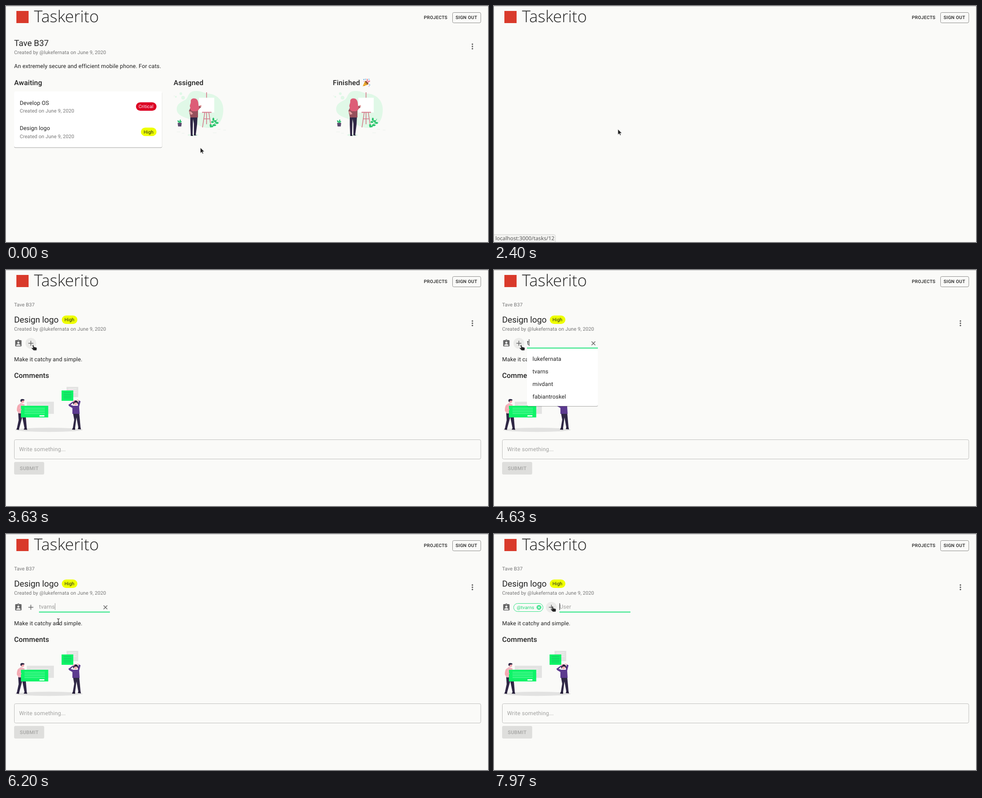
Animation of 1067 by 525 pixels, one loop 8000 ms. Source, as an HTML page:

```html
<!DOCTYPE html>
<html lang="en">
<head>
<meta charset="utf-8">
<title>Taskerito</title>
<style>
html, body { margin: 0; width: 100%; height: 100%; overflow: hidden; background: #fafaf8; }
svg { display: block; }
text { font: 12.5px Roboto, sans-serif; letter-spacing: .117px; fill: #222; white-space: pre; text-rendering: geometricPrecision; }
.small { font-size: 10.94px; fill: #757575; }
.title { font-size: 18.75px; letter-spacing: 0; }
.head { font-size: 15.62px; font-weight: 500; }
.button { font-size: 10.94px; font-weight: 500; letter-spacing: .31px; }
.nav { font-size: 10.16px; font-weight: 500; letter-spacing: .29px; }
.tag { font-size: 10.3px; }
.hint { fill: #a2a2a0; }
.brand { font: 300 36px "Open Sans", sans-serif; letter-spacing: 0; }
.url { font: 11.8px "Noto Sans", sans-serif; letter-spacing: 0; fill: #555; }
.paper { fill: #fff; filter: drop-shadow(0 1px .6px rgba(0,0,0,.36)); }
.icon { fill: none; stroke: #666; stroke-width: 1.5; }
</style>
</head>
<body>
<svg id="stage" width="1067" height="525" viewBox="0 0 1067 525">
<defs>
  <clipPath id="rowClip"><rect x="18" y="252" width="327.5" height="56"/></clipPath>

  <g id="high">
    <rect width="34.5" height="18.75" rx="9.4" fill="#eeff00"/>
    <text class="tag" x="6.1" y="13">High</text>
  </g>

  <g id="dots" fill="#666"><circle cy="-5" r="1.7"/><circle r="1.7"/><circle cy="5" r="1.7"/></g>

  <g id="painter">
    <path d="M378 228C379 216 390 213 398 208C405 202 402 189 421 189C434 189 438 194 449 195C468 197 481 211 481 230C481 254 470 271 449 271C427 272 419 257 402 250C386 245 377 239 378 228Z" fill="#e0f8e7"/>
    <g fill="#e0f8e7"><circle cx="387" cy="195" r="3"/><circle cx="376" cy="202" r="2"/><circle cx="392" cy="204" r="4"/></g>
    <g fill="none" stroke="#e9f0eb"><path d="M371 200h3M378 280h8M389 283h6M468 274h7M481 276h6M458 282h8"/></g>
    <ellipse cx="414" cy="287" rx="12" ry="2.5" fill="#dff5e6"/>
    <g fill="none" stroke="#d5798a" stroke-width="1.6"><path d="M444 192V263M440 237L435 270M449 237L454 270M437 251H451"/></g>
    <rect x="427" y="204" width="34" height="33" fill="#fff"/>
    <path d="M434 236.5H455" stroke="#d5798a" stroke-width="2"/>
    <path d="M408 245H424L423 264L420 287H416L416 262L414 251L413 288H409L408 264Z" fill="#2f2745"/>
    <path d="M409 288l5-1v2h-5zM416 287h5l1 1h-6z" fill="#231d35"/>
    <path d="M411 221L405 233L407 242L408 248H425L425 231L432 225L430 221L422 226Z" fill="#96505c"/>
    <path d="M405 234l4 8 5-2-4-5zM429 222l3-2 1 3-2 2z" fill="#e6a0a0"/>
    <path d="M409 211C410 204 421 204 424 210C427 216 425 221 428 226C428 232 422 235 417 234C411 235 407 231 408 226C405 220 410 218 409 211Z" fill="#dd5d77"/>
    <path d="M380 260h9l-1 8h-7z" fill="#5b4a6d"/>
    <path d="M384 260q-5-1-4-6 4 1 4 6q-1-5 2-8 3 4-2 8q1-4 5-4 0 4-5 4" fill="#2fbf72"/>
    <path d="M452 270Q461 266 468 251" fill="none" stroke="#28c46b"/>
    <g fill="#28c46b">
      <ellipse cx="459" cy="252" rx="2" ry="3.5"/><ellipse cx="463" cy="256" rx="3" ry="2"/>
      <ellipse cx="467" cy="260" rx="3.5" ry="2"/><ellipse cx="457" cy="258" rx="3" ry="2"/>
      <ellipse cx="461" cy="265" rx="4" ry="2"/><ellipse cx="453" cy="265" rx="2.5" ry="2"/>
      <ellipse cx="455" cy="268" rx="4" ry="1.8"/>
    </g>
  </g>

  <g id="arrow"><path d="M-.8 0V12.4L2.2 9.8L4.2 14L6.1 13.1L4.2 9H8.2Z" fill="#222" stroke="#fff" stroke-width=".7"/></g>
  <g id="hand"><path d="M.5 2C.3 0 2.6 0 3 1.6L4 5L8.3 6C10 6.4 10.6 7.5 10.3 9L9.7 13H3.4L-1.3 8.6C-2 7.2 -.4 6.6 .8 7.2L1.8 7.6Z" fill="#222" stroke="#fff" stroke-width=".6"/></g>
  <g id="beam"><path d="M-3-6.5Q0-6.5 0-5Q0-6.5 3-6.5M0-5V5M-3 6.5Q0 6.5 0 5Q0 6.5 3 6.5M-1.5 1H1.5" fill="none" stroke="#333" stroke-width="1.2"/></g>
</defs>

<rect width="1067" height="525" fill="#fafaf8"/>
<rect width="1067" height="1" fill="#c6c6c5"/>
<rect x="23" y="11" width="27" height="27" fill="#d93a2b"/>
<text class="brand" x="62" y="36">Taskerito</text>
<text class="nav" x="925" y="29.3">PROJECTS</text>
<rect x="988.5" y="14.5" width="62.5" height="23" rx="3" fill="none" stroke="#8c8c8b"/>
<text class="nav" x="995.3" y="29.3">SIGN OUT</text>

<g id="board">
  <text class="title" x="18" y="89">Tave B37</text>
  <text class="small" x="18" y="107">Created by @lukefernata on June 9, 2020</text>
  <use href="#dots" x="1032.5" y="90"/>
  <text x="18" y="138">An extremely secure and efficient mobile phone. For cats.</text>
  <text class="head" x="18" y="176">Awaiting</text>
  <text class="head" x="371" y="176">Assigned</text>
  <text class="head" x="723.5" y="176">Finished</text>
  <g id="popper">
    <path d="M789.5 179L795 166.5Q801 169 802 174.5Z" fill="#f4b92f"/>
    <path d="M791 175.5l4 1.8M793 171l6 4.8" stroke="#d9822b" stroke-width="1.4"/>
    <ellipse cx="798.5" cy="170.5" rx="2" ry="5" transform="rotate(-42 798.5 170.5)" fill="#8d5a34"/>
    <path d="M798 169q3-3 1-7M801 171q1-4 5-4" fill="none" stroke="#e0475b" stroke-width="1.5"/>
    <path d="M791 163l2 1M795 162l1 2M803 162l1 2M804 175l2 1" stroke="#4598d8" stroke-width="1.6"/>
    <path d="M792 167l1 1M802 166l1 1M803 179l1-1" stroke="#d367b5" stroke-width="1.6"/>
  </g>
  <rect class="paper" x="18" y="190" width="327.5" height="124.5" rx="3"/>
  <g clip-path="url(#rowClip)">
    <rect id="rowHover" x="18" y="252" width="328" height="56" fill="#f2f2f1"/>
    <circle id="rowRipple" cx="275" cy="274" opacity=".1"/>
  </g>
  <text x="30.5" y="220">Develop OS</text>
  <text class="small" x="30.5" y="237">Created on June 9, 2020</text>
  <rect x="287.7" y="214.2" width="45.5" height="18.75" rx="9.4" fill="#dc0023"/>
  <text class="tag" x="293.4" y="227.2" style="fill:#fff">Critical</text>
  <text x="30.5" y="276.3">Design logo</text>
  <text class="small" x="30.5" y="293.5">Created on June 9, 2020</text>
  <use href="#high" x="298.7" y="270.5"/>
  <use href="#painter"/>
  <use href="#painter" x="353"/>
</g>

<g id="task">
  <text class="small" x="18" y="81.3">Tave B37</text>
  <text class="title" x="18" y="117">Design logo</text>
  <use href="#high" x="123.5" y="101.3"/>
  <text class="small" x="18" y="135">Created by @lukefernata on June 9, 2020</text>
  <use href="#dots" x="1032.5" y="118.5"/>
  <path transform="translate(18 153.7) scale(.781)" fill="#666" d="M19 3h-4.18C14.4 1.84 13.3 1 12 1c-1.3 0-2.4.84-2.82 2H5c-1.1 0-2 .9-2 2v14c0 1.1.9 2 2 2h14c1.1 0 2-.9 2-2V5c0-1.1-.9-2-2-2zm-7 0c.55 0 1 .45 1 1s-.45 1-1 1-1-.45-1-1 .45-1 1-1zm0 4c1.66 0 3 1.34 3 3s-1.34 3-3 3-3-1.34-3-3 1.34-3 3-3zm6 12H6v-1.4c0-2 4-3.1 6-3.1s6 1.1 6 3.1V19z"/>
  <text x="18" y="202.5">Make it catchy and simple.</text>
  <text class="head" x="18" y="240">Comments</text>

  <g id="talk">
    <ellipse cx="95" cy="355.5" rx="75" ry="4.7" fill="#e2e2e1"/>
    <rect x="46" y="293" width="60" height="27" fill="#e3e3e2"/>
    <path d="M54 300H98M54 304H98M54 308H98" stroke="#f1f1f0"/>
    <rect x="134" y="260" width="26" height="23" fill="#e3e3e2"/>
    <path d="M138 264.5H156M138 268.5H156M138 272.5H156" stroke="#f5f5f4"/>
    <path d="M27 317H43L46 352H41L36 327L29 353H24L28 334Z" fill="#2f2745"/>
    <path d="M23 355l1-3h5v3.5zM39 355l2-3h5l1 3.5z" fill="#251d38"/>
    <path d="M33 296L27 300L24 313L28 319H41V299Z" fill="#f2b3bf"/>
    <circle cx="36.5" cy="292" r="3.8" fill="#f4a9b0"/>
    <path d="M32 292Q31 287 36 287Q41 287 41 290L35 291L34 294Z" fill="#2f2745"/>
    <rect x="33" y="302" width="60.5" height="26" fill="#0ef468"/>
    <path d="M41 307.5H86M41 311.5H86M41 315.5H86M41 319.5H86" stroke="#7dfaae"/>
    <rect x="74" y="323" width="11" height="3" fill="#e9fff1"/>
    <path d="M26 301Q22 312 26 315L34 312V309L28 309L31 302Z" fill="#f4a9b0"/>
    <path d="M148 317H162L165 350H160L156 328L153 351H148L151 333Z" fill="#2f2745"/>
    <path d="M146 355l2-4h5v4.5zM159 354l1-4h5l1 4.5z" fill="#251d38"/>
    <path d="M149 302L143 300L150 294L149 292L138 300L140 303L147 307L147 320H163L162 304L165 292L161 290L159 302Z" fill="#5c3a8f"/>
    <circle cx="154" cy="297" r="3.5" fill="#f4a9b0"/>
    <path d="M149 300Q147 290 154 290Q161 290 160 300L157 295H152Z" fill="#30203f"/>
    <rect x="123" y="268" width="26" height="23" fill="#0ef468"/>
    <path d="M127 272.5H145M127 276.5H145M127 280.5H145M127 284.5H145" stroke="#15bd5a"/>
    <path d="M148 293l3-4 2 1-3 4zM161 291l-5-2 1-1 6 2z" fill="#f4a9b0"/>
  </g>

  <rect x="18.5" y="377.5" width="1032.5" height="43" rx="3" fill="none" stroke="#bebebc"/>
  <text class="hint" x="29" y="403.3">Write something...</text>
  <rect x="18" y="427" width="66.5" height="28" rx="3" fill="#dededc"/>
  <text class="button" x="30.5" y="445" style="fill:#a5a5a3">SUBMIT</text>

  <g id="chip">
    <rect x="43.5" y="154.5" width="65" height="18" rx="9" fill="none" stroke="#2fe283"/>
    <text class="tag" x="50.5" y="167" style="fill:#1fd875">@tvarns</text>
    <circle cx="99.5" cy="163.3" r="5.4" fill="#48e493"/>
    <path d="M97.5 161.3l4 4m0-4l-4 4" stroke="#fff" stroke-width="1.2"/>
  </g>

  <g id="tools">
    <circle id="plusHover" cx="55" cy="163" r="12" opacity=".06"/>
    <circle id="plusRipple" cx="55" cy="163" opacity=".1"/>
    <path class="icon" d="M49.5 163h11M55 157.5v11"/>
    <g id="field">
      <path d="M73 173.5H230" stroke="#8d8d8c"/>
      <rect id="underline" x="73" y="172.7" width="157" height="1.8" fill="#0ce373"/>
      <text id="hint" class="hint" x="73" y="165.5">User</text>
      <g id="entry">
        <text id="value" x="73" y="165.5"></text>
        <rect id="caret" y="154" width="1" height="15" fill="#222"/>
      </g>
      <path id="clear" class="icon" d="M216 159l8.2 8.2m0-8.2l-8.2 8.2"/>
      <g id="popup">
        <rect id="sheet" class="paper" x="73" y="176.5" width="157" rx="3"/>
        <rect id="optionHover" x="73" y="183" width="157" height="28.2" fill="#f3f3f3"/>
        <g id="options"></g>
      </g>
    </g>
  </g>
</g>

<g id="status">
  <path d="M-1 508.5H132Q136 508.5 136 512V526H-1Z" fill="#f3f3f1" stroke="#d2d2d0"/>
  <text class="url" x="3" y="521">localhost:3000/tasks/12</text>
</g>
<use id="cursor" href="#arrow"/>
</svg>

<script>
const LOOP = 8000;
const el = {};
document.querySelectorAll('#stage [id]').forEach(n => el[n.id] = n);

const users = ['lukefernata', 'tvarns', 'mivdant', 'fabiantroskel'];
const typing = [[0, ''], [4600, 't'], [4870, 'tv'], [5030, 'tva'], [5100, 'tvar'], [6100, 'tvarns'], [6400, '']];

// time, x, y, shape from then on
const path = [
  [0, 431, 315, 'arrow'], [1230, 431, 315, 'arrow'], [1470, 342, 289, 'hand'], [1700, 275, 274, 'hand'],
  [2400, 275, 274, 'arrow'], [2770, 275, 274, 'arrow'], [3070, 151, 146, 'arrow'], [3270, 151, 146, 'arrow'],
  [3560, 64, 164, 'hand'], [3630, 58, 166, 'hand'], [5670, 58, 166, 'hand'], [5970, 116, 195, 'hand'],
  [6130, 116, 195, 'beam'], [6900, 116, 195, 'beam'], [7030, 119, 184, 'arrow'], [7130, 123, 171, 'hand'],
  [7270, 127, 160, 'hand'], [LOOP, 127, 160, 'hand']
];

const clamp = v => Math.min(1, Math.max(0, v));
const ramp = (t, from, span) => clamp((t - from) / span);
const ease = p => 1 - (1 - p) ** 3;
const within = (t, a, b) => t >= a && t < b;
const show = (node, on) => node.style.display = on ? '' : 'none';
const set = (node, name, v) => node.setAttribute(name, v);

function ripple(node, t, start, span, radius) {
  const p = ramp(t, start, span);
  show(node, p > 0 && p < 1);
  set(node, 'r', radius * ease(p));
  set(node, 'opacity', .12 * (1 - p * p));
}

function moveCursor(t) {
  const i = path.findLastIndex(k => k[0] <= t);
  const [t0, x0, y0, shape] = path[i];
  const [t1, x1, y1] = path[i + 1];
  const p = (t - t0) / (t1 - t0);
  set(el.cursor, 'href', '#' + shape);
  set(el.cursor, 'transform', `translate(${x0 + (x1 - x0) * p} ${y0 + (y1 - y0) * p})`);
}

let shown = null;
function fill(value) {
  if (value === shown) return;
  shown = value;
  el.value.textContent = value;
  const list = users.filter(u => u.includes(value));
  el.options.innerHTML = list.map((u, i) => `<text x="85.3" y="${201.7 + 28.2 * i}">${u}</text>`).join('');
  set(el.sheet, 'height', 13.5 + 28.2 * list.length);
}

function drawField(t) {
  const second = t >= 7000;
  const open = second ? 7600 : 4130;
  const press = second ? 7470 : 4030;
  const value = typing.findLast(k => k[0] <= t)[1];
  const added = t >= 6400;

  show(el.chip, added);
  set(el.tools, 'transform', `translate(${added ? 72 : 0} 0)`);
  show(el.plusHover, within(t, 3560, 5740) || t >= 7130);
  ripple(el.plusRipple, t, press, 450, 12);

  show(el.field, within(t, 4130, 6570) || t >= 7600);
  set(el.field, 'opacity', ramp(t, open - 40, 150));
  const grow = ease(ramp(t, open, 200)) * (second ? 1 : 1 - ramp(t, 6230, 170));
  set(el.underline, 'x', 151.5 - 78.5 * grow);
  set(el.underline, 'width', 157 * grow);

  fill(value);
  show(el.hint, !value);
  show(el.clear, value);
  set(el.entry, 'opacity', within(t, 6170, 6400) ? .45 : 1);
  set(el.caret, 'x', 73 + (value ? el.value.getComputedTextLength() : 0));
  show(el.caret, !within(t, 6230, 7000));
  show(el.popup, within(t, 4600, 6130));
  show(el.optionHover, t >= 5790);
}

function render(t) {
  show(el.board, t < 2370);
  show(el.task, t >= 2570);
  show(el.rowHover, t >= 1470);
  ripple(el.rowRipple, t, 2330, 400, 260);
  show(el.status, within(t, 1500, 2630));
  if (t >= 2570) drawField(t);
  moveCursor(t);
}

const start = performance.now();
function tick() {
  render((performance.now() - start) % LOOP);
  requestAnimationFrame(tick);
}
tick();
</script>
</body>
</html>
```
